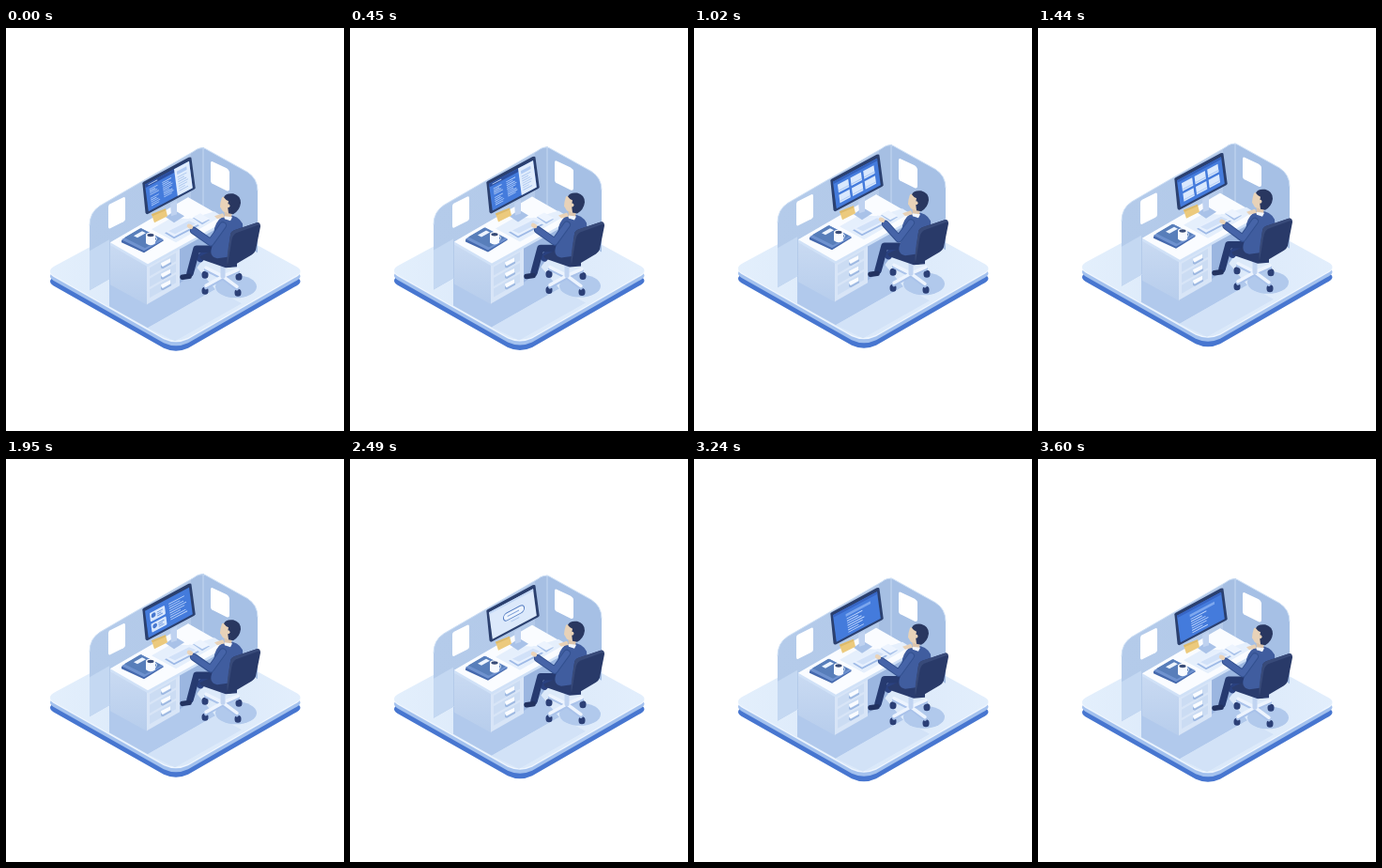
Recreate the animation shown at these times as an HTML page. Size 360x429 px, loop 3.63 s.

```html
<!DOCTYPE html>
<html lang="en">
<head>
<meta charset="utf-8">
<title>Desk scene</title>
<style>
  html, body { margin: 0; width: 100%; height: 100%; overflow: hidden; background: #fff; }
  svg { display: block; }
  .hidden { display: none; }
</style>
</head>
<body>
<svg width="360" height="429" viewBox="0 0 360 429">
  <defs>
    <path id="slab" d="M53 255Q41 261 53 267L168 332Q181 338 194 332L307 267Q320 261 307 255L194 193Q181 187 168 193Z"/>
    <clipPath id="floorClip"><use href="#slab"/></clipPath>
    <linearGradient id="floorFill" x2="1"><stop stop-color="#e3effc"/><stop offset=".5" stop-color="#dae8f9"/><stop offset="1" stop-color="#e2eefc"/></linearGradient>
    <linearGradient id="leftFill" x2="1"><stop stop-color="#b4cbea"/><stop offset="1" stop-color="#b3c9e9"/></linearGradient>
    <linearGradient id="deskFill" x2="0" y2="1"><stop stop-color="#c9daf2"/><stop offset="1" stop-color="#b7cdec"/></linearGradient>
    <g id="drawer">
      <path d="M153 256L181 240V249L153 265Z" fill="#cbdcf3"/>
      <path d="M165 251L175 246V250L166 255Z" fill="#fafcff"/>
      <path d="M165 253L167 255L176 250V252L167 257L165 256Z" fill="#9db8e1"/>
    </g>
  </defs>

  <g id="scene">
    <!-- platform -->
    <use href="#slab" y="9.5" fill="#4776d0"/>
    <use href="#slab" y="4" fill="#a3c1ee"/>
    <use href="#slab" fill="#eff6fe"/>
    <use href="#slab" y="-1.5" fill="url(#floorFill)"/>
    <g clip-path="url(#floorClip)">
      <path d="M110 268V297L151 320L223 279L190 240Z" fill="#b1c9ec"/>
      <path d="M151 320L223 279L251 294L180 334Z" fill="#d2e2f7"/>
      <ellipse cx="245" cy="276" rx="22" ry="12" fill="#b1c9ec"/>
    </g>

    <!-- walls -->
    <path d="M89 280V211Q89 197 100 190L200 132Q206 128 211 128V210Z" fill="url(#leftFill)"/>
    <path d="M89 238L110 226V268L89 280Z" fill="#c4d8f2"/>
    <path d="M210 128L257 154Q268 161 268 174V240L210 207Z" fill="#a6c0e5"/>
    <path d="M197 134Q205 128 210 128V203L197 192Z" fill="#a6bfe3"/>
    <path d="M89 211Q89 197 100 190L200 132Q206 127 212 129L257 154Q268 161 268 174" fill="none" stroke="#cddff5"/>
    <path d="M210 129V203" stroke="#c5d8f1"/>
    <path d="M111 188L125 181Q127 180 127 183V204Q127 206 125 207L111 214Q109 215 109 212V191Q109 189 111 188Z" fill="#fff"/>
    <path d="M220 143L235 150Q238 152 238 154V172Q238 175 235 174L221 167Q218 166 218 163V145Q218 142 220 143Z" fill="#fff"/>

    <!-- desk -->
    <path d="M184 228L226 207V226L197 264L184 273Z" fill="#9bb6e0"/>
    <path d="M111 231L151 253V296L111 274Z" fill="url(#deskFill)"/>
    <path d="M150 252L185 232V275L150 295Z" fill="#d8e5f7"/>
    <use href="#drawer"/>
    <use href="#drawer" y="11.500"/>
    <use href="#drawer" y="23"/>
    <path d="M111 229L194 181L236 205V208L151 255L111 232Z" fill="#d0e1f7"/>
    <path d="M111 229L194 181L236 205L151 252Z" fill="#fafcff"/>
    <path d="M155 215L176 203L196 204L222 196L230 201L181 229Z" fill="#e5effc"/>

    <!-- things on the desk -->
    <path d="M123 227L144 214L168 227L147 240L123 229Z" fill="#4468ad"/>
    <path d="M123 226L144 214L168 226L147 238Z" fill="#6f92cf"/>
    <path d="M126 224L143 214L165 225L148 235Z" fill="#587eba"/>
    <path d="M136 222L145 217L149 219L140 224Z" fill="#edf4fe"/>
    <path d="M149 221V230Q154 234 159 230V221Z" fill="#f7faff"/>
    <path d="M159 223Q162 224 159 228" fill="none" stroke="#e1ebfa"/>
    <ellipse cx="154" cy="221" rx="5" ry="2.6" fill="#fff"/>
    <ellipse cx="154" cy="221.2" rx="3.6" ry="1.7" fill="#394c78"/>
    <path d="M169 219L196 205L206 211L179 225Z" fill="#9db9e6"/>
    <path d="M169 217L196 203L206 209L179 223Z" fill="#e7f0fd"/>
    <path d="M173 217L195 206L202 209L180 220Z" fill="#d1e1f8"/>
    <path d="M199 203L207 199L217 205L209 210Z" fill="#a6c0e9"/>
    <path d="M199 202L207 198L217 204L209 208Z" fill="#edf4fe"/>

    <!-- monitor -->
    <path d="M170 202L180 195L190 201L179 208Z" fill="#a9c2e8"/>
    <path d="M175 188L182 184V199L176 201Z" fill="#bfd2f0"/>
    <g transform="translate(-.5 -.5)">
      <path d="M146 168Q145 166 147 165L195 139Q198 138 198 140L202 170Q203 172 201 173L152 199Q150 200 149 198Z" fill="#2b406f"/>
      <g id="screens" transform="matrix(.47 -.25 .063 .475 148.5 168)"></g>
    </g>
    <path d="M155 199L170 193L172 201L158 208Z" fill="#ecca7d"/>
    <path d="M155 199L170 193V195L156 201Z" fill="#dcba6c"/>

    <!-- chair base -->
    <g stroke-linecap="round" fill="none">
      <path d="M212 280V281M247 282V283M212 263V264M248 265V266" stroke="#2c4077" stroke-width="7"/>
      <path d="M213 277L231 267L246 278M213 258L231 267L247 260" stroke="#a9c2ea" stroke-width="4"/>
      <path d="M213 275L231 265L246 276M213 256L231 265L247 258" stroke="#edf4fe" stroke-width="3.5"/>
      <path d="M231 253V265" stroke="#c1d4f1" stroke-width="5"/>
    </g>

    <!-- person and chair -->
    <g stroke-linecap="round" stroke-linejoin="round" fill="none">
      <path d="M236 240L212 239L207 246" stroke="#2a4180" stroke-width="8"/>
      <path d="M230 236L203 236L196 262" stroke="#263a70" stroke-width="7.5"/>
      <path d="M195 265L188 266" stroke="#223260" stroke-width="5.500"/>
    </g>
    <path d="M206 244L219 238L246 247V255L234 256L208 247Z" fill="#2a3c6e"/>
    <path d="M234 200Q247 199 252 209L254 242L225 246Q215 244 220 232L222 214Q225 203 234 200Z" fill="#405d9f"/>
    <path d="M243 216L267 208Q271 207 271 212L266 237Q265 240 262 242L240 255Q235 256 235 252L239 221Q239 218 243 216Z" fill="#293a69"/>
    <path d="M243 216L267 208Q270 207 270 210L245 219Q241 221 240 229L236 253Q234 249 239 221Q239 218 243 216Z" fill="#384a79"/>
    <path d="M232 191L241 194L240 204L233 204Z" fill="#dcc5ad"/>
    <path d="M230 181Q228 187 228 191L231 196L237 198L242 186L237 179Z" fill="#e8d2b8"/>
    <path d="M232 181Q234 176 242 177Q250 179 250 187Q249 195 242 199L237 198L236 190L237 185Q234 184 232 181Z" fill="#293760"/>
    <circle cx="236.500" cy="190" r="2" fill="#e8d2b8"/>
    <path d="M232 201L241 202L239 206L233 204Z" fill="#f2f6fd"/>
    <path d="M222 201L231 198L233 202L225 204Z" fill="#e8d2b8"/>
    <g stroke-linecap="round" stroke-linejoin="round" fill="none">
      <path id="armShade" stroke="#32508f" stroke-width="8"/>
      <path id="arm" stroke="#4664a8" stroke-width="6"/>
      <path id="hand" stroke="#ead4ba" stroke-width="4.500"/>
    </g>
  </g>
</svg>

<script>
const LOOP = 3630;
const $ = id => document.getElementById(id);
const rect = (x, y, w, h, fill, extra = '') =>
  `<rect x="${x}" y="${y}" width="${w}" height="${h}" fill="${fill}" ${extra}/>`;

// Short text-like bars, each row with its own length
const lines = (x, y, count, width, gap, fill) =>
  Array.from({ length: count }, (_, i) =>
    rect(x, y + i * gap, width * (0.6 + 0.4 * Math.abs(Math.sin(i * 2.3 + 1))), 1.8, fill)).join('');

const blue = rect(0, 0, 100, 60, '#447bdc');

const tiles = [0, 1, 2, 3, 4, 5].map(i => {
  const x = 9 + i % 3 * 29, y = 11 + (i > 2) * 23;
  return rect(x, y, 24, 18, '#d9e8fd') + rect(x, y + 13, 24, 2, '#a8c6f3');
}).join('');

const cards = [10, 34].map(y =>
  rect(9, y, 34, 19, '#dae8fd', 'rx="2"') +
  `<circle cx="17" cy="${y + 8}" r="5" fill="#4777cf"/>` +
  lines(25, y + 5, 3, 14, 4, '#6792dc')).join('');

const pages = [
  blue + rect(0, 0, 66, 7, '#2c4f9f') + lines(7, 3, 1, 22, 3, '#bcd4fa') +
    lines(8, 14, 4, 20, 4, '#c3d8fa') + lines(8, 34, 5, 20, 4, '#aecaf9') +
    lines(37, 14, 9, 22, 4, '#b9d2fb') +
    rect(66, 0, 34, 60, '#e1edfd') + rect(71, 8, 22, 7, '#b2ccf4') +
    lines(71, 20, 7, 22, 5, '#a9c4ed'),
  blue + rect(0, 0, 100, 5, '#3462bd') + tiles,
  blue + cards + lines(52, 11, 8, 38, 5, '#c2d8fb'),
  rect(0, 0, 100, 60, '#dce9fb') + rect(0, 0, 100, 4, '#c3d8f6') +
    rect(29, 21, 47, 16, '#edf4fe', 'rx="8" stroke="#5079c0" stroke-width="2"') +
    lines(38, 28, 1, 28, 3, '#7d9fd8') + lines(44, 43, 1, 20, 3, '#a9c4ec'),
  blue + rect(0, 0, 100, 5, '#3765c4') + rect(27, 12, 56, 6, '#7da7ee') +
    lines(28, 22, 7, 38, 5, '#c8dcff')
];
$('screens').innerHTML = pages.map(page => `<g>${page}</g>`).join('');
const screens = [...$('screens').children];

function draw(now) {
  const t = now % LOOP;
  const bob = -0.7 - 2.5 * (1 - Math.cos(2 * Math.PI * t / LOOP));
  $('scene').setAttribute('transform', `translate(0 ${bob})`);

  const current = Math.floor(t / LOOP * screens.length);
  screens.forEach((screen, i) => screen.classList.toggle('hidden', i !== current));

  const lift = Math.exp(-(((t - 1020) / 300) ** 2));
  const x = 195 + 4 * lift, y = 211.5 - 4 * lift;
  const sleeve = `M231 211L218 ${229 - lift}L${x + 5} ${y + 5}`;
  $('arm').setAttribute('d', sleeve);
  $('armShade').setAttribute('d', sleeve);
  $('hand').setAttribute('d', `M${x} ${y}l2 1`);
}

const start = performance.now();
function tick() {
  draw(performance.now() - start);
  requestAnimationFrame(tick);
}
tick();
</script>
</body>
</html>
```
